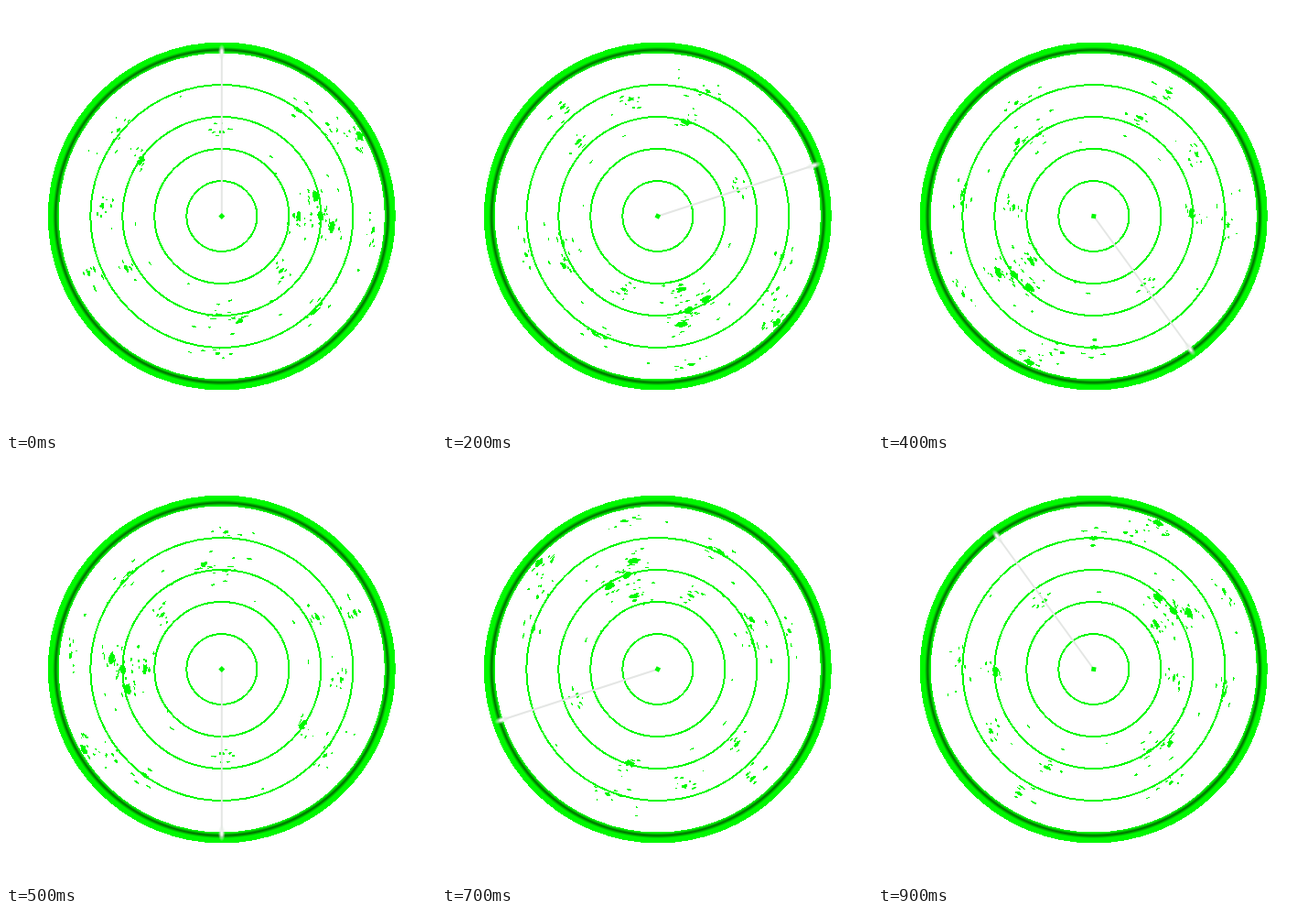
An HTML page for the animation above (1000 ms loop, 470x464 px).

```html
<!DOCTYPE html>
<html lang="en">
<head>
<meta charset="utf-8">
<title>Radar</title>
<style>
  html, body { margin: 0; width: 100%; height: 100%; overflow: hidden; background: #fff; }
  svg { display: block; width: 470px; height: 464px; }
</style>
</head>
<body>
<svg viewBox="0 0 470 464">
  <defs>
    <radialGradient id="rim" gradientUnits="userSpaceOnUse" cx="0" cy="0" r="190">
      <stop offset=".94" stop-color="#00f800"/>
      <stop offset=".956" stop-color="#006c00"/>
      <stop offset=".972" stop-color="#00f800"/>
    </radialGradient>
    <radialGradient id="glow">
      <stop offset="0" stop-color="#fff"/>
      <stop offset=".4" stop-color="#e8eee8" stop-opacity=".8"/>
      <stop offset="1" stop-color="#dde8dd" stop-opacity="0"/>
    </radialGradient>
  </defs>
  <g transform="translate(235.8 229.5)">
    <circle r="184" fill="none" stroke="url(#rim)" stroke-width="12" shape-rendering="crispEdges"/>
    <g id="rings" fill="none" stroke="#00f800" stroke-width="2" shape-rendering="crispEdges"/>
    <g id="spin">
      <path id="blips" fill="#00f800" shape-rendering="crispEdges"/>
      <path d="M0 0V-182" stroke="#e4e6e4" stroke-width="2"/>
      <ellipse cy="-179" rx="4" ry="9" fill="url(#glow)"/>
      <path d="M0-3.5L3.5 0 0 3.5-3.5 0z" fill="#00f800"/>
    </g>
  </g>
</svg>
<script>
const STEP = 100, STEPS = 10, RINGS = 4;
const $ = id => document.getElementById(id);
const rad = deg => deg * Math.PI / 180;

let seed = 11;
const rand = () => (seed = (seed * 16807) % 2147483647) / 2147483647;
const between = (a, b) => a + rand() * (b - a);
const spread = size => (rand() + rand() - 1) * size;

// Main echoes: angle, radius, size
const echoes = [
  [-12, 105, 6], [0, 108, 5], [6, 121, 6], [0, 84, 4.5],
  [80, 116, 4], [92, 108, 3.5], [92, 150, 2.5], [215, 107, 5],
  [220, 147, 3], [185, 131, 3], [157, 158, 3], [151, 119, 3.5],
  [43, 88, 3], [46, 146, 3], [-30, 174, 5], [-54, 143, 4],
  [-41, 153, 3], [5, 166, 3], [-90, 92, 3]
];

// Ragged patch, drawn out along the circle it lies on
function blob(angle, radius, along, across) {
  const points = [], n = 11;
  for (let i = 0; i < n; i++) {
    const turn = i / n * 2 * Math.PI, k = between(0.65, 1.25);
    const a = rad(angle) + Math.sin(turn) * along * k / radius;
    const r = radius + Math.cos(turn) * across * k;
    points.push((r * Math.cos(a)).toFixed(1) + " " + (r * Math.sin(a)).toFixed(1));
  }
  return "M" + points.join("L") + "z";
}

const speck = (angle, radius) => blob(angle, radius, between(1, 3), between(0.6, 1.2));

let shape = "";
for (const [angle, radius, size] of echoes) {
  shape += blob(angle, radius, size * 1.2, size * 0.6);
  for (let i = 0; i < 4 + size; i++) {
    shape += speck(angle + spread(10), Math.min(radius + spread(14), 174));
  }
}
for (let i = 0; i < 35; i++) shape += speck(between(0, 360), between(75, 170));
$("blips").setAttribute("d", shape);

for (let i = 0; i < RINGS; i++) {
  const ring = document.createElementNS("http://www.w3.org/2000/svg", "circle");
  ring.setAttribute("r", 38.5 + 35 * i);
  $("rings").append(ring);
}

function draw(time) {
  const step = Math.floor(time / STEP) % STEPS;
  $("spin").setAttribute("transform", `rotate(${step * 360 / STEPS})`);
}

const start = performance.now();
function tick() {
  draw(performance.now() - start);
  requestAnimationFrame(tick);
}
tick();
</script>
</body>
</html>
```
